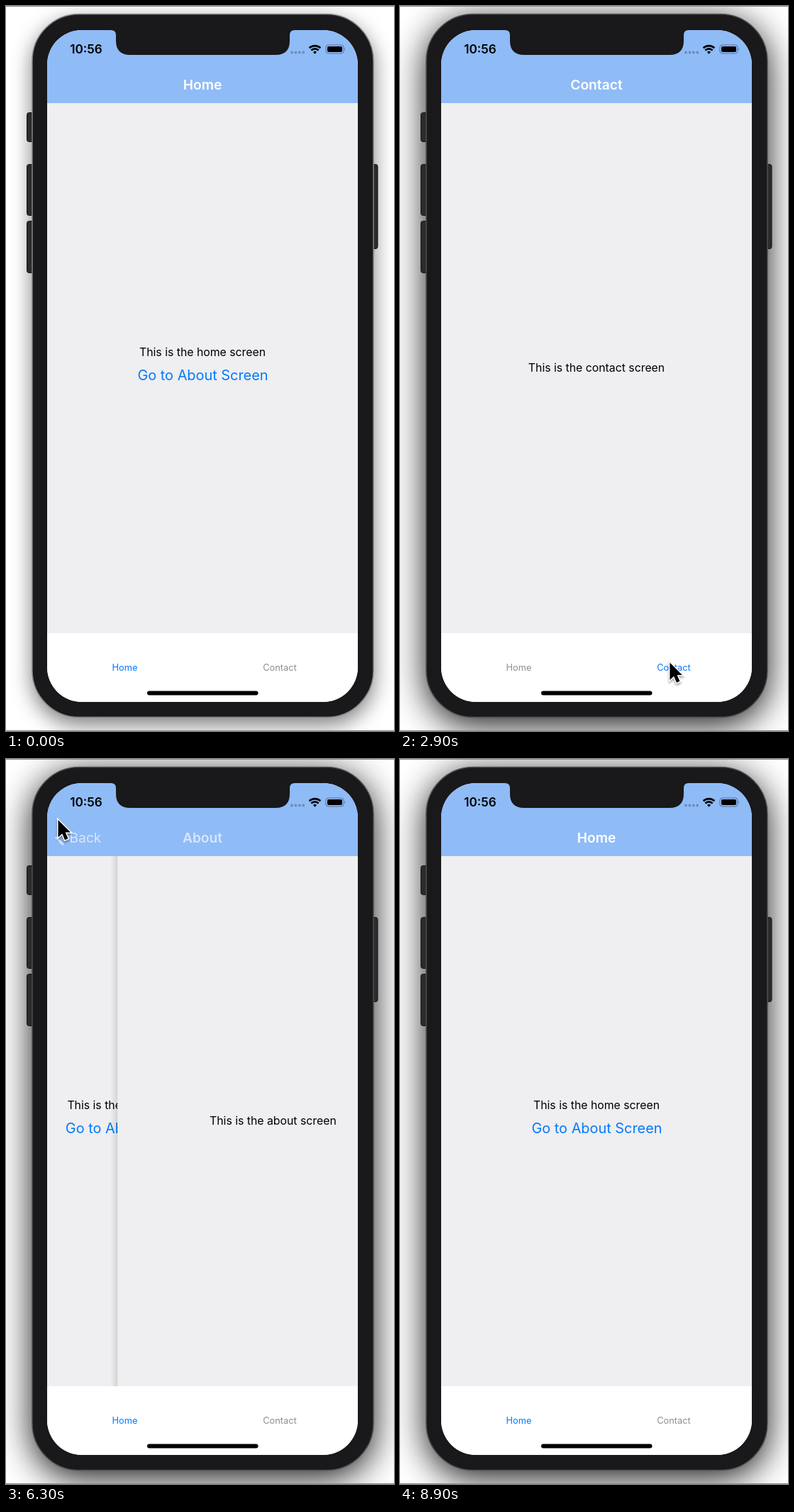
An HTML page that plays this animation: 547x1023 px, repeating every 9.8 s.

```html
<!DOCTYPE html>
<html lang="en">
<head>
<meta charset="utf-8">
<title>Tab and stack navigation</title>
<style>
  html, body { margin: 0; height: 100%; overflow: hidden; background: #fff; }
  svg { display: block; width: 100vw; height: 100vh; }
  text { font-family: Inter, "Open Sans", sans-serif; font-size: 15.8px; text-anchor: middle; }
  .title { font-size: 19.2px; font-weight: 600; fill: #fff; }
  .link { font-size: 19.9px; fill: #007aff; }
  .tab { font-size: 12.8px; }
  #cursor { filter: drop-shadow(0 2px 1.5px rgba(0, 0, 0, .4)); }
</style>
</head>
<body>
<svg viewBox="0 0 547 1023">
  <defs>
    <clipPath id="screen"><rect x="58" y="34" width="438" height="948" rx="49"/></clipPath>
    <clipPath id="content"><rect x="58" y="137" width="438" height="748"/></clipPath>
    <linearGradient id="edge">
      <stop offset="0" stop-opacity="0"/>
      <stop offset="1" stop-opacity=".12"/>
    </linearGradient>
  </defs>

  <rect id="shadow" x="37" y="21" width="481" height="993" rx="66"/>
  <path d="M0 .5H547M0 1022.5H547" stroke="#8c8c8c"/>

  <g fill="#2b2a2d" stroke="#161517">
    <rect x="29.5" y="150.5" width="12" height="41" rx="3"/>
    <rect x="29.5" y="223.5" width="12" height="72" rx="3"/>
    <rect x="29.5" y="303.5" width="12" height="73" rx="3"/>
    <rect x="512" y="223.5" width="12" height="119" rx="3"/>
  </g>
  <rect id="bezel" x="37" y="11.5" width="481" height="992" rx="66" fill="#19181a" stroke-width="1.5"/>

  <g clip-path="url(#screen)">
    <path fill="#efeef0" d="M58 34h438v948H58z"/>
    <g clip-path="url(#content)">
      <g id="homeCard">
        <text x="277" y="494">This is the home screen</text>
        <text id="link" class="link" x="277.5" y="528">Go to About Screen</text>
      </g>
      <g id="aboutCard">
        <path fill="url(#edge)" d="M48 137h10v748H48z"/>
        <path fill="#efeef0" d="M58 137h438v748H58z"/>
        <text x="277" y="516">This is the about screen</text>
      </g>
      <text id="contactCard" x="277" y="516">This is the contact screen</text>
    </g>

    <path fill="#8fbbf7" d="M58 34h438v103H58z"/>
    <text id="homeTitle" class="title" x="277" y="118">Home</text>
    <text id="contactTitle" class="title" x="277" y="118">Contact</text>
    <g id="aboutTitle">
      <text class="title" x="277" y="118">About</text>
      <path d="M81 102l-10 9.500 10 9.500" fill="none" stroke="#fff" stroke-width="3"/>
      <text class="title" x="112" y="118" style="font-weight:400">Back</text>
    </g>

    <path fill="#fff" d="M58 885h438v97H58z"/>
    <text id="homeTab" class="tab" x="167.500" y="937.500">Home</text>
    <text id="contactTab" class="tab" x="386" y="937.500">Contact</text>
    <rect x="199" y="966.500" width="156.500" height="6" rx="3"/>
  </g>

  <path fill="#19181a" d="M148 33v1q7 0 7 7v8q0 20 20 20h205q20 0 20-20v-8q0-7 7-7v-1z"/>
  <text x="113" y="67" style="font-size:17.200px;font-weight:600">10:56</text>
  <path d="M403 65.500h17" stroke="#000" stroke-opacity=".25" stroke-width="3.800" stroke-linecap="round" stroke-dasharray="0 5.400"/>
  <g fill="none" stroke="#000" stroke-width="2.700">
    <path d="M427.700 59.300a11 11 0 0 1 15.600 0M430.400 62.600a7 7 0 0 1 10.200 0"/>
    <path d="M433 65a3.700 3.700 0 0 1 5 0l-2.500 2.700z" fill="#000" stroke="none"/>
  </g>
  <rect x="451" y="55" width="25" height="12" rx="3.500" fill="none" stroke="#000" stroke-opacity=".4"/>
  <rect x="453" y="57" width="21" height="8" rx="2"/>
  <path d="M477.500 59v4q1.500-2 0-4z" fill-opacity=".5"/>

  <path id="cursor" d="M0 0V24.500L5.700 19.200 9.500 28.200 14 26.300 10.200 17.500H17.500Z" stroke="#fff" stroke-width="3" paint-order="stroke"/>
</svg>

<script>
const LOOP = 9800, FRAME = 100, WIDTH = 438;
const el = Object.fromEntries([...document.querySelectorAll('[id]')].map(node => [node.id, node]));

// Pointer stops: time, x, y
const stops = [
  [200, 515, 995], [300, 415, 519], [600, 415, 519], [1500, 384, 835], [1800, 381.500, 874],
  [2100, 380, 922], [2600, 380, 922], [3600, 382, 943], [3900, 177.500, 922], [4100, 177.500, 922],
  [5000, 299, 504], [5300, 299, 504], [6000, 73.500, 86], [6400, 73.500, 86], [7000, 348, 844],
  [7100, 349, 892], [7200, 349, 892], [7500, 401, 940], [7700, 401, 940], [8400, 170, 929], [8900, 170, 929]
];

const clamp = x => Math.min(1, Math.max(0, x));
const within = (t, from, to) => t >= from && t < to;

// cubic-bezier(.2833, .99, .3183, .99)
function ease(x) {
  x = clamp(x);
  if (x === 0 || x === 1) return x;
  const axis = (u, a, b) => 3 * (1 - u) ** 2 * u * a + 3 * (1 - u) * u * u * b + u ** 3;
  let low = 0, high = 1;
  for (let i = 0; i < 20; i++) {
    const mid = (low + high) / 2;
    if (axis(mid, .2833, .3183) < x) low = mid; else high = mid;
  }
  return axis(low, .99, .99);
}

function pointerAt(t) {
  const i = stops.findIndex(stop => stop[0] > t);
  const [t0, x0, y0] = stops[i - 1], [t1, x1, y1] = stops[i];
  const k = (t - t0) / (t1 - t0), s = k * k * (3 - 2 * k);
  return [x0 + (x1 - x0) * s, y0 + (y1 - y0) * s];
}

const headerFade = distance => Math.max(0, 1 - 1.6 * distance, .6 - .8 * distance);
const show = (node, visible) => node.style.display = visible ? '' : 'none';
const moveTo = (node, x, y = 0) => node.setAttribute('transform', `translate(${x} ${y})`);

function draw(t) {
  const active = t >= 600;
  el.shadow.style.filter = `blur(${active ? 25 : 15}px)`;
  el.shadow.style.opacity = active ? .92 : .52;
  el.bezel.style.stroke = active ? '#4f4f50' : '#828284';

  const contact = within(t, 2400, 4100) || within(t, 7700, 8600);
  const pushed = ease((t - 5170) / 500) - ease((t - 6267) / 500);

  show(el.homeCard, !contact);
  show(el.contactCard, contact);
  show(el.contactTitle, contact);
  show(el.aboutCard, pushed > 0);
  moveTo(el.homeCard, -.3 * WIDTH * pushed);
  moveTo(el.aboutCard, WIDTH * (1 - pushed));
  el.homeTitle.style.opacity = contact ? 0 : headerFade(pushed);
  el.aboutTitle.style.opacity = headerFade(1 - pushed);
  el.link.style.opacity = within(t, 5100, 5500) ? .2 + .8 * clamp((t - 5200) / 250) : 1;
  el.homeTab.style.fill = contact ? '#8e8e93' : '#007aff';
  el.contactTab.style.fill = contact ? '#007aff' : '#8e8e93';

  const hasPointer = within(t, 200, 8900);
  show(el.cursor, hasPointer);
  if (hasPointer) moveTo(el.cursor, ...pointerAt(t));
}

function tick() {
  const t = performance.now() % LOOP;
  draw(Math.floor(t / FRAME) * FRAME);
  requestAnimationFrame(tick);
}
tick();
</script>
</body>
</html>
```
